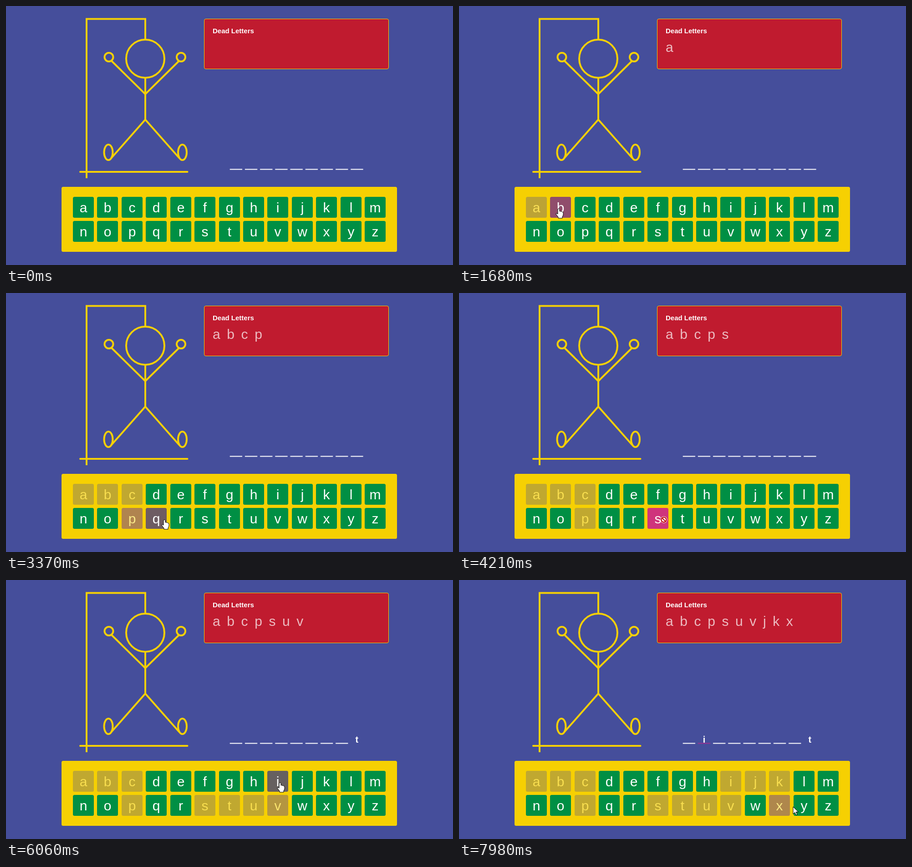
Recreate the animation shown at these times as an HTML page. Size 982x570 px, loop 8 s.

```html
<!DOCTYPE html>
<html lang="en">
<head>
<meta charset="utf-8">
<title>Hangman</title>
<style>
  html, body { margin: 0; width: 100%; height: 100%; overflow: hidden; background: #454e9b; }
  svg { display: block; font-family: "Liberation Sans", Arial, sans-serif; fill: #fff; }
  .man { fill: none; stroke: #f6d002; stroke-width: 4; }
  .key { font-size: 30px; text-anchor: middle; }
  .guess { font-size: 20px; font-weight: bold; text-anchor: middle; }
</style>
</head>
<body>
<svg id="stage" width="982" height="570" viewBox="0 0 982 570">
  <g class="man">
    <path d="M177 379V28.5H306V74M306 158V250M232 121L306 194L380 121M231 335L306 250L381 335"/>
    <path d="M163 365H398.500" stroke-linecap="round"/>
    <circle cx="306" cy="116" r="42"/>
    <circle cx="226" cy="112.5" r="9.5"/>
    <circle cx="384.5" cy="112.5" r="9.5"/>
    <ellipse cx="225" cy="322" rx="9.5" ry="17"/>
    <ellipse cx="387.5" cy="322" rx="9.5" ry="17"/>
  </g>
  <rect x="435.5" y="28.5" width="405" height="110" rx="3.5" fill="#c01b2f" stroke="#f6d002"/>
  <text x="454" y="60" font-size="15" font-weight="bold">Dead Letters</text>
  <text id="dead" x="454" y="101" font-size="30" letter-spacing="14.6" opacity=".7"></text>
  <g id="word"></g>
  <rect x="122" y="398" width="737" height="143" rx="3.5" fill="#f6d002"/>
  <g id="keys"></g>
  <g id="cursor">
    <path id="arrow" d="M0 0V16l3.8-3.6 2.6 6 2.6-1.1-2.6-5.8h5z" stroke="#000"/>
    <path id="hand" stroke="#000" stroke-linejoin="round"
      d="M-2 1Q0-1.5 2 1V6Q4 4.5 5 6.5Q7 5.5 8 7.5Q10 7 10 9.5V14L8 18V21H-1V18.5L-6 12Q-6 9.5-4 10.5L-2 12Z"/>
    <g id="banned" stroke="#c8141e" stroke-width="2.4">
      <circle r="7.5" stroke="none"/>
      <circle r="5.5"/>
      <path d="M-4-4L4 4"/>
    </g>
  </g>
</svg>
<script>
const LOOP = 8000, START = 210, STEP = 76.9;
const FADE = 600, HOVER = 480, SIZE = 46;
const TRAVEL = 0.55; // share of each pause between clicks spent moving
const GREEN = [0, 143, 68], PINK = [216, 43, 128], BLUE = [69, 78, 155];
const SOLUTION = { i: 1, t: 8 };
const clicks = { a: 1230, b: 2200, c: 2560, p: 3130, s: 4160, t: 4735, u: 5330, v: 5740,
                 i: 6260, j: 6820, k: 7270, x: 7735, y: 8700 };

const $ = id => document.getElementById(id);
const mix = (a, b, p) => a + (b - a) * p;
const blend = (a, b, p) => a.map((v, i) => mix(v, b[i], p));
const clamp = p => Math.min(1, Math.max(0, p));

function add(parent, tag, attrs) {
  const el = document.createElementNS("http://www.w3.org/2000/svg", tag);
  for (const name in attrs) el.setAttribute(name, attrs[name]);
  return parent.appendChild(el);
}

// CSS "ease": cubic-bezier(.25, .1, .25, 1)
function ease(p) {
  let lo = 0, hi = 1, s = 0.5;
  for (let i = 0; i < 16; i++) {
    s = (lo + hi) / 2;
    if (0.75 * s * (1 - s) + s ** 3 < p) lo = s; else hi = s;
  }
  return p >= 1 ? 1 : 0.3 * s * (1 - s) ** 2 + 3 * s * s * (1 - s) + s ** 3;
}

const keys = [..."abcdefghijklmnopqrstuvwxyz"].map((letter, i) => {
  const x = Math.round(147 + 53.43 * (i % 13)), y = i < 13 ? 420 : 473;
  const group = add($("keys"), "g", { class: "key" });
  const box = add(group, "rect", { x, y, width: SIZE, height: SIZE, rx: 3.5 });
  add(group, "text", { x: x + SIZE / 2, y: y + 33.5 }).textContent = letter;
  return { letter, x, y, group, box, click: clicks[letter] ?? Infinity,
           changes: [{ time: -HOVER, from: 0, to: 0 }] };
});

const slots = Array.from({ length: 9 }, (_, i) => {
  const x = 491.7 + 33.2 * i;
  return {
    line: add($("word"), "rect", { x, y: 358.5, width: 27.3, height: 2 }),
    text: add($("word"), "text", { x: x + 13.6, y: 358, class: "guess" })
  };
});

// The pointer enters from below, then goes from one clicked key to the next
const stops = [{ time: START, at: [878, 562] }];
for (const letter in clicks) {
  const { x, y, click } = keys.find(key => key.letter === letter);
  stops.push({ time: click, at: [x + 28, y + 26] });
}

function pointer(t) {
  const n = Math.max(1, stops.findIndex(stop => stop.time > t));
  const from = stops[n - 1], to = stops[n];
  return blend(from.at, to.at, clamp((t - from.time) / (to.time - from.time) / TRAVEL));
}

const contains = (key, [x, y]) => x >= key.x && x < key.x + SIZE && y >= key.y && y < key.y + SIZE;

function hoverLevel(key, t) {
  const { time, from, to } = key.changes.findLast(change => change.time <= t);
  const length = HOVER * Math.abs(to - from) || 1;
  return mix(from, to, ease(clamp((t - time) / length)));
}

// Record when the pointer enters and leaves each key
for (let t = START; t < LOOP; t += 5) {
  const at = pointer(t);
  for (const key of keys) {
    const to = +contains(key, at);
    if (t < key.click && key.changes.at(-1).to !== to)
      key.changes.push({ time: t, from: hoverLevel(key, t), to });
  }
}

function draw(t) {
  for (const key of keys) {
    const used = ease(clamp((t - key.click) / FADE));
    const hover = hoverLevel(key, Math.min(t, key.click));
    const color = blend(blend(GREEN, PINK, hover), BLUE, used);
    key.box.setAttribute("fill", `rgb(${color.map(Math.round)})`);
    key.group.setAttribute("opacity", 1 - 0.7 * used);
  }

  $("dead").textContent = Object.keys(clicks)
    .filter(letter => !(letter in SOLUTION) && clicks[letter] <= t).join("");

  for (const letter in SOLUTION) {
    const { line, text } = slots[SOLUTION[letter]], found = clicks[letter] <= t;
    text.textContent = found ? letter : "";
    line.setAttribute("fill", !found ? "#fff" : letter === "i" ? "#9a3092" : "none");
  }

  const at = pointer(t), over = keys.find(key => contains(key, at));
  const shape = t < START ? "" : !over ? "arrow" : over.click <= t ? "banned" : "hand";
  for (const id of ["arrow", "hand", "banned"])
    $(id).setAttribute("display", id === shape ? "inline" : "none");
  $("cursor").setAttribute("transform", `translate(${at.map(Math.round)})`);
}

function tick() {
  const t = performance.now() % LOOP;
  draw(t < START ? 0 : START + Math.floor((t - START) / STEP) * STEP);
  requestAnimationFrame(tick);
}
tick();
</script>
</body>
</html>
```
